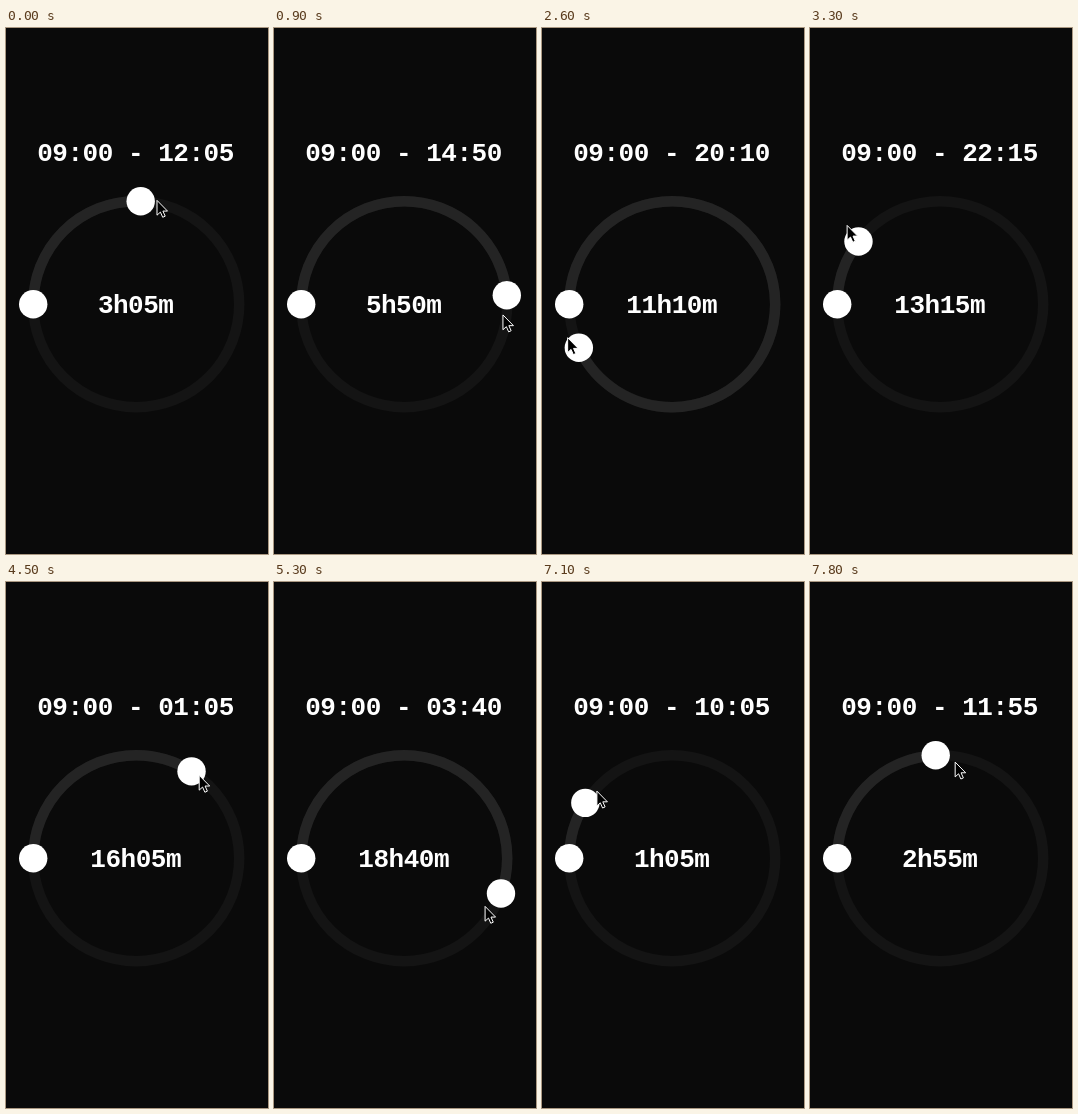
Recreate the animation shown at these times as an HTML page. Size 262x526 px, loop 7.9 s.

```html
<!DOCTYPE html>
<html lang="en">
<head>
<meta charset="utf-8">
<title>Time range dial</title>
<style>
  html, body { margin: 0; width: 100%; height: 100%; overflow: hidden; background: #0a0a0a; }
  svg { display: block; width: 100vw; height: 100vh; }
  .ring { fill: none; stroke: #141414; stroke-width: 10.5; }
  #arc { stroke: #242424; }
  .knob { fill: #fff; }
  text {
    font: bold 26px "Liberation Mono", monospace;
    letter-spacing: -0.48px;
    text-anchor: middle;
    fill: #fff;
    white-space: pre;
  }
  #pointer { fill: #000; stroke: #fff; stroke-linejoin: round; }
</style>
</head>
<body>
<svg viewBox="0 0 262 526">
  <text id="range" x="129.5" y="132.5"></text>
  <text id="span" x="129.7" y="285"></text>
  <g transform="translate(130.2 276.2)">
    <circle class="ring" r="103"/>
    <circle class="ring" id="arc" r="103" pathLength="720" transform="rotate(180)"/>
    <circle class="knob" cx="-103" r="14.2"/>
    <circle class="knob" id="end" r="14.2"/>
    <path id="pointer" d="M.4 .2V15L3.8 11.9L6.1 17.1L8.6 16L6.3 10.9H10.9Z"/>
  </g>
</svg>
<script>
  const LOOP = 7900, STEP = 100, START = 9 * 60, TURN = 24 * 60;

  // A hand drags the end knob through one day: time in ms, minutes since
  // start, degrees the pointer leads the knob, pointer distance from centre.
  const KEYS = [
    [0, 185, 8.6, 106],
    [1800, 515, 12.5, 94.7],
    [3300, 795, 2.7, 122.4],
    [4500, 965, 4.5, 104],
    [5300, 1120, 10.8, 93.7],
    [6400, 1385, 7.4, 104.9],
    [7800, 1615, 11.1, 97.4]
  ];

  const $ = id => document.getElementById(id);
  const pad = n => String(n).padStart(2, "0");
  const clock = m => pad(Math.floor(m / 60) % 24) + ":" + pad(m % 60);

  // Key i on the endless timeline, one day later per loop.
  function key(i) {
    const n = KEYS.length, lap = Math.floor(i / n);
    const [t, minutes, lead, reach] = KEYS[i - lap * n];
    return [t + lap * LOOP, minutes + lap * TURN, lead, reach];
  }

  // Smooth cubic through the keys.
  function sample(t) {
    const i = KEYS.findLastIndex(k => k[0] <= t);
    const [a, b, c, d] = [i - 1, i, i + 1, i + 2].map(key);
    const gap = c[0] - b[0], p = (t - b[0]) / gap, q = 1 - p;
    return b.map((v, j) => {
      const out = (c[j] - a[j]) / (c[0] - a[0]) * gap;
      const into = (d[j] - v) / (d[0] - b[0]) * gap;
      return q * q * ((1 + 2 * p) * v + p * out) + p * p * ((1 + 2 * q) * c[j] - q * into);
    });
  }

  function place(el, degrees, radius) {
    const a = degrees * Math.PI / 180;
    el.setAttribute("transform", `translate(${radius * Math.sin(a)} ${-radius * Math.cos(a)})`);
  }

  function draw(t) {
    const [, raw, lead, reach] = sample(t);
    const minutes = Math.round(raw / 5) * 5;
    const length = minutes % TURN;
    const angle = (START + minutes) / 2;
    $("range").textContent = clock(START) + " - " + clock(START + minutes);
    $("span").textContent = Math.floor(length / 60) + "h" + pad(length % 60) + "m";
    $("arc").setAttribute("stroke-dasharray", `${minutes % 720} 720`);
    place($("end"), angle, 103);
    place($("pointer"), angle + lead, reach);
  }

  const origin = performance.now();
  function frame() {
    const t = (performance.now() - origin) % LOOP;
    draw(Math.floor(t / STEP) * STEP);
    requestAnimationFrame(frame);
  }
  frame();
</script>
</body>
</html>
```
